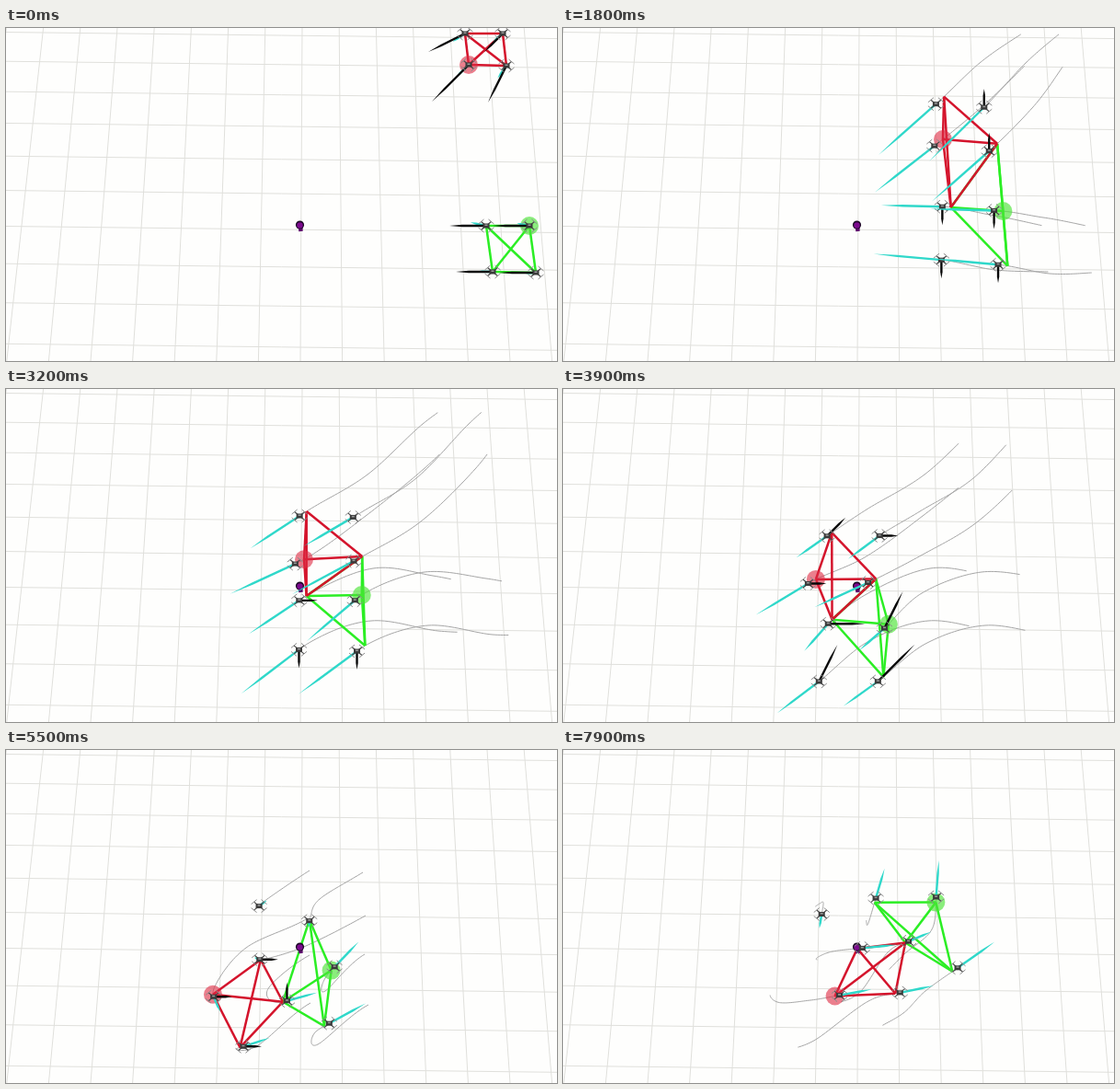
An HTML page with a canvas that plays this animation: 599 px wide and 362 px high, repeating every 8000 ms.

```html
<!DOCTYPE html>
<html lang="en">
<head>
<meta charset="utf-8">
<title>Drone formations</title>
<style>
html, body { margin: 0; width: 100%; height: 100%; overflow: hidden; background: #fefefd; }
canvas { display: block; }
</style>
</head>
<body>
<canvas id="stage" width="599" height="362"></canvas>
<script>
const ctx = document.getElementById('stage').getContext('2d');
const LOOP = 8, TRAIL = 2.5, LAG = .14;
const CYAN = '#2fd8ca', BLACK = '#080808', GRID = '#e0e0dc';

// One waypoint per second, as x,y pairs
const paths = {
  A: [499,6, 453,38, 393,93, 330,131, 284,162, 273,171, 279,167, 283,166, 281,180],
  B: [540,6, 503,38, 446,97, 388,133, 341,162, 331,181, 330,188, 332,188, 341,158],
  C: [503,40, 454,87, 391,138, 328,183, 261,215, 227,257, 233,274, 269,272, 304,266],
  D: [544,41, 510,87, 451,144, 391,180, 326,213, 283,227, 276,226, 293,219, 329,215],
  E: [522,215, 464,203, 399,195, 330,223, 286,258, 292,274, 322,264, 353,220, 378,207],
  F: [569,215, 522,206, 455,199, 390,222, 347,262, 347,248, 371,222, 401,195, 406,156],
  G: [529,265, 470,263, 397,252, 331,275, 274,321, 250,325, 276,314, 332,273, 370,263],
  H: [576,266, 529,267, 459,257, 394,277, 339,320, 336,307, 370,286, 394,262, 433,234]
};
const names = Object.keys(paths);

// Members of each formation by phase
const teams = [
  { color: '#2bee24', halo: 'rgba(75,228,55,.65)', leader: 'F', members: ['EFGH', 'DEFH', 'BEFH'] },
  { color: '#d4142c', halo: 'rgba(222,42,66,.6)', leader: 'C', members: ['ABCD', 'ACDE', 'CDEG'] }
];
const phaseAt = t => t < 1.8 ? 0 : t < 4.7 ? 1 : 2;

// Catmull-Rom spline: at rest before the first waypoint, coasting after the last
function position(name, time) {
  const list = paths[name], last = list.length / 2 - 1;
  const t = Math.max(0, time), i = Math.floor(t), u = t - i;
  return [0, 1].map(c => {
    const at = k => {
      const j = Math.min(last, Math.max(0, k)), p = list[2 * j + c];
      return k > last ? p + (k - last) * (p - list[2 * last - 2 + c]) : p;
    };
    const [a, b, d, e] = [-1, 0, 1, 2].map(k => at(i + k));
    return b + u / 2 * (d - a + u * (2 * a - 5 * b + 4 * d - e + u * (3 * (b - d) + e - a)));
  });
}

function velocity(name, t) {
  const p = position(name, t - .1), q = position(name, t + .1);
  return [0, 1].map(c => (q[c] - p[c]) / .2);
}

// Thrust comes in steps of 20 along each axis, at most two steps
function thrust(name, t) {
  const v = velocity(name, t - .4), w = velocity(name, t + .4);
  return [0, 1].map(c => 20 * Math.max(-2, Math.min(2, Math.trunc((w[c] - v[c]) / 20))));
}

function polyline(points, color, width) {
  ctx.beginPath();
  points.forEach(p => ctx.lineTo(...p));
  ctx.strokeStyle = color;
  ctx.lineWidth = width;
  ctx.stroke();
}

function disc(x, y, r, color) {
  ctx.fillStyle = color;
  ctx.beginPath();
  ctx.arc(x, y, r, 0, 7);
  ctx.fill();
}

function drawGrid() {
  for (let k = -9; k <= 8; k++)
    polyline([[322 + 40.2 * k, 0], [320 + 45.6 * k, 362]], GRID, 1);
  for (let n = -6; n <= 3; n++) {
    const y = 219 + 39.8 * n / (1 - .022 * n);
    polyline([[0, y - 3.5], [599, y + 3.5]], GRID, 1);
  }
}

function drawMarker() {
  polyline([[320, 214], [320.5, 221]], '#5c0a6c', 4.5);
  disc(319.5, 214, 4.6, '#1c0826');
  disc(319.5, 214.5, 3.2, '#7c0a8e');
}

function drawTrail(name, t) {
  const points = [position(name, t)];
  for (let s = t; s > Math.max(0, t - TRAIL); s -= .05) points.push(position(name, s));
  polyline(points, '#a6a6a6', 1);
}

// Formation corners follow where the drones were a moment ago
function drawTeam({ color, halo, leader, members }, t) {
  const points = [...members[phaseAt(t)]].map(name => position(name, t - LAG));
  points.forEach((p, i) => points.slice(i + 1).forEach(q => polyline([p, q], color, 2.5)));
  disc(...position(leader, t - LAG), 10, halo);
}

function drawDrone([x, y]) {
  for (const sx of [-1, 1]) for (const sy of [-1, 1]) {
    const px = x + sx * 5.5, py = y + sy * 4.5;
    polyline([[x, y], [px, py]], '#4a4a4a', 1.2);
    polyline([[px - 3, py + sx * sy * 2.5], [px + 3, py - sx * sy * 2.5]], '#8c8c8c', 1);
  }
  ctx.fillStyle = '#3a3a3a';
  ctx.fillRect(x - 3.5, y - 2.5, 7, 5);
  ctx.fillStyle = '#999';
  ctx.fillRect(x - 1.5, y - 1.5, 3, 1.5);
}

function drawArrow([x, y], [dx, dy], color) {
  const len = Math.hypot(dx, dy);
  if (len < 3) return;
  const nx = -dy / len * 1.2, ny = dx / len * 1.2, neck = .65;
  ctx.fillStyle = color;
  ctx.beginPath();
  ctx.moveTo(x + nx, y + ny);
  ctx.lineTo(x + dx * neck + nx, y + dy * neck + ny);
  ctx.lineTo(x + dx, y + dy);
  ctx.lineTo(x + dx * neck - nx, y + dy * neck - ny);
  ctx.lineTo(x - nx, y - ny);
  ctx.fill();
}

function draw(t) {
  ctx.fillStyle = '#fefefd';
  ctx.fillRect(0, 0, 599, 362);
  drawGrid();
  names.forEach(name => drawTrail(name, t));
  teams.forEach(team => drawTeam(team, t));
  drawMarker();
  for (const name of names) {
    const p = position(name, t);
    drawArrow(p, velocity(name, t), CYAN);
    drawArrow(p, thrust(name, t), BLACK);
    drawDrone(p);
  }
}

const start = performance.now();
function tick() {
  const elapsed = (performance.now() - start) / 1000 % LOOP;
  draw(Math.floor(elapsed * 10) / 10);
  requestAnimationFrame(tick);
}
tick();
</script>
</body>
</html>
```
